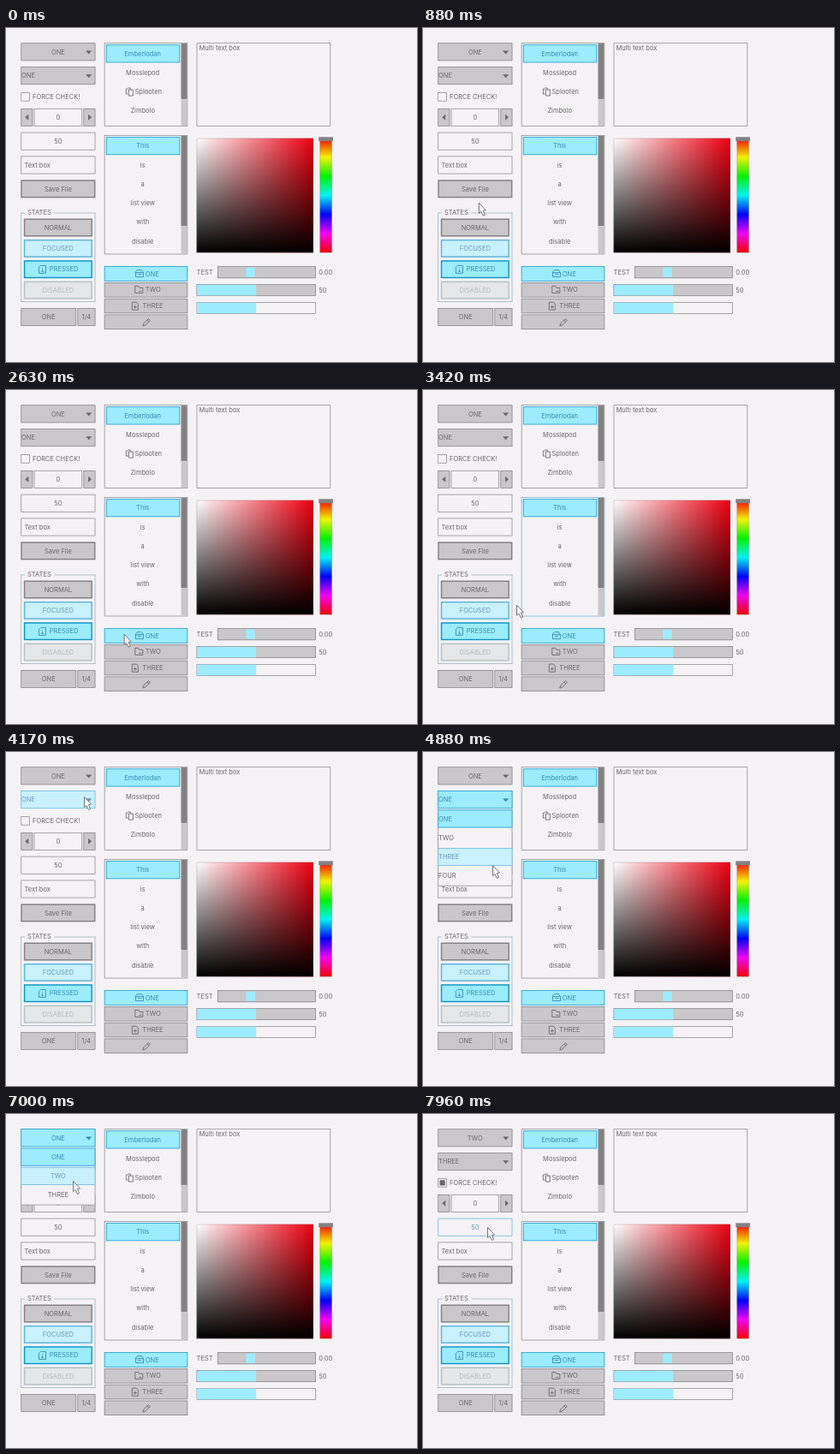
Animation, 480 px wide and 390 px high, one loop 8 s. Source, as an HTML page with a canvas:

```html
<!DOCTYPE html>
<html lang="en">
<head>
<meta charset="utf-8">
<title>GUI controls</title>
<style>
html, body { margin: 0; width: 480px; height: 390px; overflow: hidden; background: #f4f2f5; }
canvas { display: block; }
</style>
</head>
<body>
<canvas id="stage" width="480" height="390"></canvas>
<script>
const ctx = document.getElementById('stage').getContext('2d');
const LOOP = 8000;
const LAG = 45;          // controls react one frame after the pointer
const SCALE = 480 / 690; // the window is laid out 690 units wide
const LEFT = 25, RIGHT = 150, ROW = 30, PITCH = 32;
const BG = '#f4f2f5';
const style = {
  normal:   { line: '#838184', fill: '#c9c7ca', text: '#69676b' },
  focused:  { line: '#5bb2d9', fill: '#c9f0fd', text: '#6299bb' },
  pressed:  { line: '#0f93c5', fill: '#9cecfe', text: '#368baf' },
  disabled: { line: '#b5c1c2', fill: '#e5e6e8', text: '#b2b8ba' }
};

// Pointer path in stage pixels: time, x, y
const path = [
  [40, 440, 215], [300, 330, 225], [600, 160, 212], [830, 64, 205],
  [950, 66, 202], [1300, 82, 120], [1560, 94, 40], [1670, 95, 6], [1785, 93, 8],
  [1830, 92, 18], [2100, 90, 110], [2350, 106, 240], [2500, 128, 290],
  [2800, 150, 278], [3100, 142, 258], [3375, 116, 252], [3400, 115.5, 252], [3420, 109, 251],
  [3700, 106, 150], [3950, 97, 34], [4170, 91, 52], [4400, 90, 56],
  [4650, 84, 98], [4880, 81, 132], [5060, 81, 129], [5350, 92, 112],
  [5705, 97, 103], [5750, 92, 55], [5830, 92, 4], [5950, 92, 4],
  [6060, 92, 22], [6300, 91, 28], [6650, 82, 52], [7000, 78, 78],
  [7600, 78, 79], [7780, 75, 118], [7960, 75, 132], [8000, 75, 132]
];
const OPEN_B = 4330, PICK_B = 5060, OPEN_A = 6200, PICK_A = 7400;

// Pointer position in layout units, or null while it is away
function pointer(t) {
  if (t < path[0][0]) return null;
  const i = path.findIndex(p => p[0] > t);
  const [t0, x0, y0] = path[i - 1], [t1, x1, y1] = path[i];
  const k = (t - t0) / (t1 - t0);
  return [(x0 + (x1 - x0) * k) / SCALE, (y0 + (y1 - y0) * k) / SCALE];
}

const inside = (p, x1, y1, x2, y2) =>
  p !== null && p[0] >= x1 && p[0] < x2 && p[1] >= y1 && p[1] < y2;

function rect(x1, y1, x2, y2, color) {
  ctx.fillStyle = color;
  ctx.fillRect(x1, y1, x2 - x1, y2 - y1);
}

function box(x1, y1, x2, y2, line, fill, width = 1) {
  if (fill) rect(x1, y1, x2, y2, fill);
  ctx.strokeStyle = line;
  ctx.lineWidth = width;
  ctx.strokeRect(x1 + width / 2, y1 + width / 2, x2 - x1 - width, y2 - y1 - width);
}

function label(text, x, y, color = style.normal.text, align = 'left') {
  ctx.fillStyle = color;
  ctx.textAlign = align;
  ctx.fillText(text, x, y + 3.9);
}

function button(text, x1, y1, x2, y2, s, width) {
  box(x1, y1, x2, y2, s.line, s.fill, width);
  label(text, (x1 + x2) / 2, (y1 + y2) / 2, s.text, 'center');
}

// Shapes are described in stage pixels and placed in layout units
function shape(d, x, y, line, fill) {
  ctx.save();
  ctx.translate(x, y);
  ctx.scale(1 / SCALE, 1 / SCALE);
  const p = new Path2D(d);
  if (fill) { ctx.fillStyle = fill; ctx.fill(p); }
  if (line) { ctx.strokeStyle = line; ctx.lineWidth = 0.9; ctx.stroke(p); }
  ctx.restore();
}

const icons = {
  paste: 'M2.5 1.5H.5V7.5H2.5M2.5 .5H5.5V2M3.5 2.5H8.5V9.5H3.5Z',
  info: 'M2.5 .5H8.5V9.5H.5V2.5ZM4.5 3V4M4.5 5V8M3.5 7.5H6',
  open: 'M.5 8.5V2.5L2.5 .5H7.5L9.5 3.5V8.5ZM.5 3.5H9.5M3 5.5H7',
  folder: 'M.5 .5H4.5L5.5 2.5H9.5V8.5H.5ZM5 6.5H8',
  add: 'M.5 .5H5.5L7.5 2.5V9.5H.5ZM4 4V8M2 6H6',
  pencil: 'M.5 9.5L1.5 6.5L7 1L9 3L3.5 8.5ZM5.5 2.5L7.5 4.5'
};

function list(items, y1, y2, thumbEnd, look, iconRow) {
  box(165, y1, 305, y2, look(165, y1, 305, y2).line);
  rect(294, y1 + 1, 304, y2 - 1, style.normal.fill);
  rect(294, y1 + 1, 304, thumbEnd, style.normal.line);
  items.forEach((text, i) => {
    const top = y1 + 3 + i * PITCH, mid = top + ROW / 2;
    const s = i === 0 ? style.pressed : look(168, top, 292, top + ROW);
    if (s !== style.normal) box(168, top, 292, top + ROW, s.line, s.fill);
    label(text, i === iconRow ? 239 : 229.5, mid, s.text, 'center');
    if (i === iconRow) shape(icons.paste, 201, mid - 7, s.text);
  });
}

function dropdown(items, chosen, y, open, centered, look, mouse) {
  const s = open ? style.pressed : look(LEFT, y, RIGHT, y + ROW);
  const x = centered ? 87.5 : 26, align = centered ? 'center' : 'left';
  if (open) box(LEFT, y, RIGHT, y + PITCH * (items.length + 1), style.normal.line, BG);
  box(LEFT, y, RIGHT, y + ROW, s.line, s.fill);
  label(items[chosen], x, y + ROW / 2, s.text, align);
  shape('M0 0H7L3.5 4Z', 134, y + 13, null, s.text);
  if (!open) return;
  items.forEach((text, i) => {
    const top = y + PITCH * (i + 1);
    const over = inside(mouse, LEFT, top, RIGHT, top + ROW);
    const st = i === chosen ? style.pressed : over ? style.focused : style.normal;
    if (st !== style.normal) box(LEFT, top, RIGHT, top + ROW, st.line, st.fill);
    label(text, x, top + ROW / 2, st.text, align);
  });
}

function colorPicker() {
  const edge = 'rgba(100, 100, 100, 0.35)';
  const tint = ctx.createLinearGradient(320, 0, 516, 0);
  tint.addColorStop(0, '#fff');
  tint.addColorStop(1, '#ee0010');
  rect(320, 185, 516, 377, tint);
  const shade = ctx.createLinearGradient(0, 185, 0, 377);
  shade.addColorStop(0, 'rgba(0, 0, 0, 0)');
  shade.addColorStop(1, '#000');
  box(320, 185, 516, 377, edge, shade);
  const hue = ctx.createLinearGradient(0, 185, 0, 377);
  for (let i = 0; i <= 6; i++) hue.addColorStop(i / 6, `hsl(${i * 60} 98% 48%)`);
  box(527, 185, 547, 377, edge, hue);
  rect(525, 183, 549, 190, style.normal.line);
}

function leftColumn(t, look) {
  const control = y => look(LEFT, y, RIGHT, y + ROW);

  const check = look(LEFT, 108, 124, 123);
  box(LEFT, 108, 40, 123, check.line);
  if (t >= PICK_A) rect(28, 111, 37, 120, style.normal.text);
  label('FORCE CHECK!', 44.5, 115, check.text);

  const less = look(25, 135, 45, 165), spin = look(47, 135, 128, 165), more = look(130, 135, 150, 165);
  box(25, 135, 45, 165, less.line, less.fill);
  shape('M4 0V7L0 3.5Z', 32, 145, null, less.text);
  button('0', 47, 135, 128, 165, { ...spin, fill: null });
  box(130, 135, 150, 165, more.line, more.fill);
  shape('M0 0V7L4 3.5Z', 138, 145, null, more.text);

  const editing = t >= PICK_B && t < OPEN_A;
  const value = editing ? style.pressed : { ...control(175), fill: null };
  button('50', LEFT, 175, RIGHT, 205, value);

  const field = control(215);
  box(LEFT, 215, RIGHT, 245, field.line);
  label('Text box', 31, 230, field.text);
  button('Save File', LEFT, 255, RIGHT, 285, control(255), 2);

  const frame = '#90abb5';
  rect(25, 310, 32, 311, frame);
  rect(81, 310, 150, 311, frame);
  rect(25, 310, 26, 460, frame);
  rect(149, 310, 150, 460, frame);
  rect(25, 459, 150, 460, frame);
  label('STATES', 36, 310);
  ['normal', 'focused', 'pressed', 'disabled'].forEach((name, i) => {
    const y = 320 + i * 35, s = style[name], withIcon = name === 'pressed';
    button(withIcon ? '' : name.toUpperCase(), 30, y, 145, y + ROW, s, 2);
    if (!withIcon) return;
    label('PRESSED', 73, y + ROW / 2, s.text);
    shape(icons.info, 54.5, y + 8, s.text);
  });

  const combo = control(470);
  button('ONE', LEFT, 470, 118, 500, combo);
  button('1/4', 120, 470, RIGHT, 500, combo);
}

function middleColumn(look) {
  list(['Emberlodan', 'Mosslepod', 'Splooten', 'Zimbolo'], 25, 165, 119, look, 2);
  list(['This', 'is', 'a', 'list view', 'with', 'disable'], 180, 380, 332, look);
  const toggles = [
    ['ONE', 'open', 217, 234], ['TWO', 'folder', 216, 234],
    ['THREE', 'add', 211, 229], ['', 'pencil', 229, 0]
  ];
  toggles.forEach(([text, icon, iconX, textX], i) => {
    const y = 400 + i * 27;
    const s = i === 0 ? style.pressed : look(165, y, 305, y + 25);
    box(165, y, 305, y + 25, s.line, s.fill);
    shape(icons[icon], iconX, y + 5.5, s.text);
    label(text, textX, y + 12.5, s.text);
  });
}

function rightColumn(look) {
  const multi = look(320, 25, 545, 165);
  box(320, 25, 545, 165, multi.line);
  label('Multi text box', 324, 33, multi.text);
  colorPicker();

  label('TEST', 320, 410);
  box(355, 400, 520, 420, look(355, 400, 520, 420).line, style.normal.fill);
  rect(403, 402, 418, 418, style.pressed.fill);
  label('0.00', 525, 410);
  box(320, 430, 520, 450, look(320, 430, 520, 450).line, style.normal.fill);
  rect(321, 431, 420, 449, style.pressed.fill);
  label('50', 525, 440);
  box(320, 460, 520, 480, style.normal.line);
  rect(321, 461, 420, 479, style.pressed.fill);
}

function draw(t) {
  const mouse = pointer(t - LAG);
  const openB = t >= OPEN_B && t < PICK_B, openA = t >= OPEN_A && t < PICK_A;
  const look = (...area) =>
    !openA && !openB && inside(mouse, ...area) ? style.focused : style.normal;

  ctx.setTransform(SCALE, 0, 0, SCALE, 0, 0);
  ctx.font = '10.8px Inter, sans-serif';
  rect(0, 0, 690, 561, BG);
  leftColumn(t, look);
  middleColumn(look);
  rightColumn(look);

  // Dropdowns lie above everything else
  dropdown(['ONE', 'TWO', 'THREE', 'FOUR'], t < PICK_B ? 0 : 2, 65, openB, false, look, mouse);
  dropdown(['ONE', 'TWO', 'THREE'], t < PICK_A ? 0 : 1, 25, openA, true, look, mouse);

  const tip = pointer(t);
  if (tip) shape('M.5 .5V12.5L3 10.5L5.5 15.5L7.5 14.5L5.5 9.5L8.5 9Z', ...tip, '#69676b', '#f8f7f9');
}

const start = performance.now();
function tick() {
  draw((performance.now() - start) % LOOP);
  requestAnimationFrame(tick);
}
tick();
</script>
</body>
</html>
```
